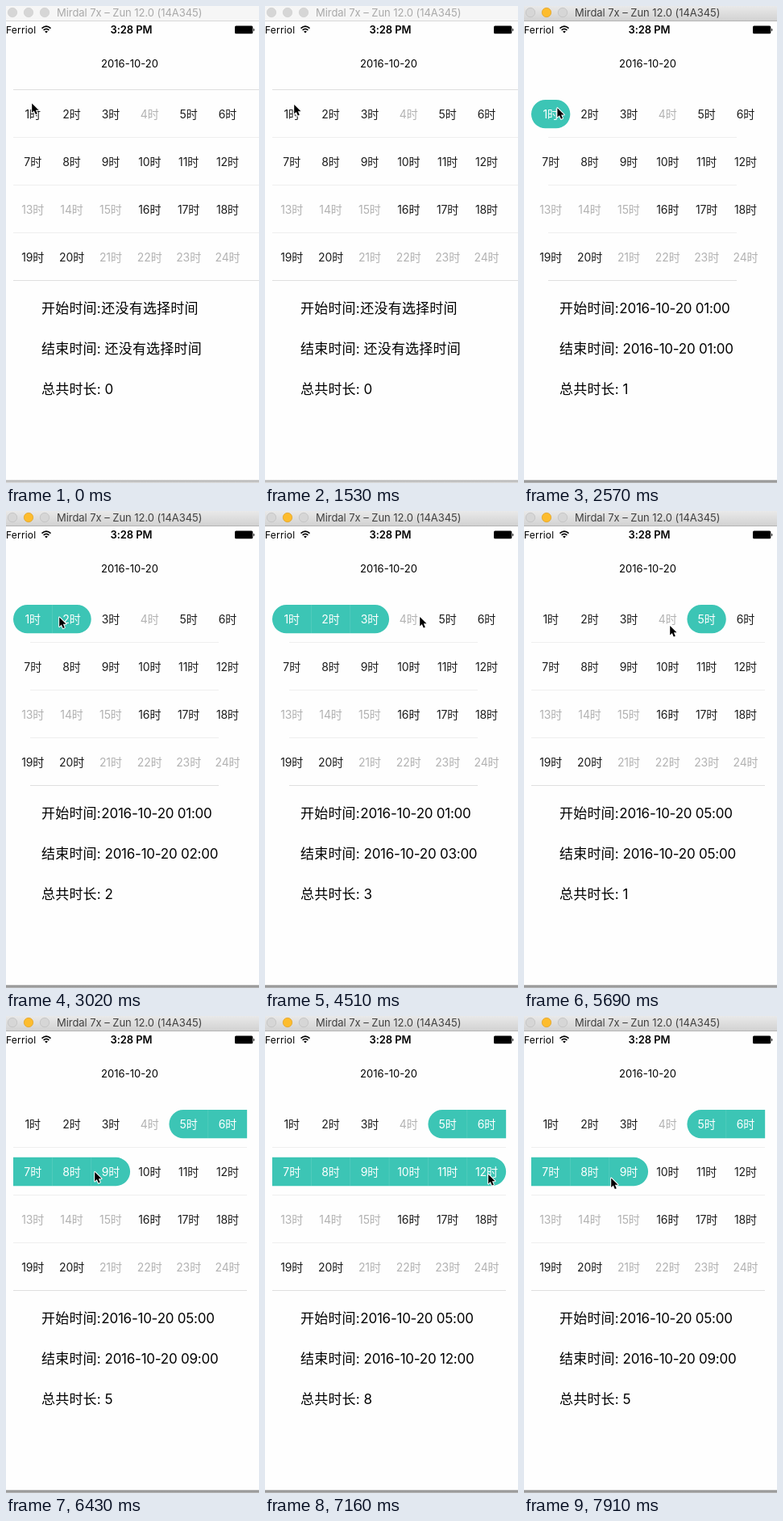
These frames come from a looping animation (314 by 590 pixels, 8000 ms). An HTML page:

```html
<!DOCTYPE html>
<html lang="zh-CN">
<head>
<meta charset="utf-8">
<title>时间选择</title>
<style>
  html, body { margin: 0; width: 100%; height: 100%; overflow: hidden; background: #fff; }
  svg { display: block; width: 314px; height: 590px; }
  text { font-family: Inter, "Noto Sans CJK SC", "Noto Sans CJK", sans-serif; white-space: pre; }
</style>
</head>
<body>
<svg id="stage" viewBox="0 0 314 590"></svg>
<script>
const LOOP = 8000, TICK = 148.5, FIRST_TICK = 325; // the screen refreshes in coarse ticks
const LEFT = 9, CELL = 48.36, TOP = 116, ROW = 58.87, PILL_H = 35.3;
const ACTIVATED = 2200;

// Eased pointer moves; a tap picks the hour under the pointer.
const START = { x: 31, y: 118.5 };
const MOVES = [
  { from: 300, to: 460, x: 35, y: 120 },
  { from: 1530, to: 1640, x: 35, y: 123, tap: 2350 },
  { from: 2420, to: 2920, x: 65, y: 129.5, tap: 2940 },
  { from: 3000, to: 3280, x: 130, y: 129.5, tap: 3380 },
  { from: 4350, to: 4460, x: 191, y: 129 },
  { from: 4490, to: 4780, x: 219, y: 138, tap: 4870 },
  { from: 5090, to: 5650, x: 180, y: 140 },
  { from: 5680, to: 6250, x: 109, y: 191, tap: 6200 },
  { from: 6580, to: 7140, x: 276, y: 194, tap: 7100 },
  { from: 7160, to: 7590, x: 125, y: 199, tap: 7700 },
  { from: 7760, to: 7890, x: 107, y: 198.5 }
];

const isBooked = h => h === 4 || (h >= 13 && h <= 15) || h > 20;
const hourAt = ({ x, y }) => 6 * Math.floor((y - TOP) / ROW) + Math.floor((x - LEFT) / CELL) + 1;
const ease = p => p * p * (3 - 2 * p);

function pointerAt(t) {
  return MOVES.reduce((pos, m) => {
    const p = ease(Math.min(1, Math.max(0, (t - m.from) / (m.to - m.from))));
    return { x: pos.x + (m.x - pos.x) * p, y: pos.y + (m.y - pos.y) * p };
  }, START);
}

// A tap resizes the range, or starts a new one when a booked hour is in the way.
function rangeAt(t) {
  let first = 0, last = 0;
  for (const move of MOVES.filter(m => m.tap <= t)) {
    last = hourAt(move);
    let blocked = !first;
    for (let h = first; h <= last; h++) blocked ||= isBooked(h);
    if (blocked) first = last;
  }
  return [first, last];
}

const rect = (x, y, w, h, fill, extra = '') =>
  `<rect x="${x}" y="${y}" width="${w}" height="${h}" fill="${fill}" ${extra}/>`;
const label = (x, y, size, content, extra = '') =>
  `<text x="${x}" y="${y}" font-size="${size}" ${extra}>${content}</text>`;
const gradient = (id, top, bottom) =>
  `<linearGradient id="${id}" x2="0" y2="1"><stop stop-color="${top}"/><stop offset="1" stop-color="${bottom}"/></linearGradient>`;

function titleBar(active) {
  let out = rect(0, 0, 314, 18, active ? 'url(#bar)' : '#f6f6f6')
    + rect(0, 18, 314, 1, active ? '#b4b4b4' : '#d8d8d8');
  for (let i = 0; i < 3; i++) {
    const lit = active && i === 1;
    out += `<circle cx="${8 + i * 20}" cy="8" r="5.7" fill="${lit ? '#fdbc2d' : '#d6d6d6'}"
      stroke="${lit ? '#dfa023' : active ? '#bdbdbd' : '#cfcfcf'}" stroke-width=".7"/>`;
  }
  return out + label(63, 13, 13, 'Mirdal 7x – Zun 12.0 (14A345)',
    `fill="${active ? '#404040' : '#a9a9a9'}" letter-spacing="-.05"`);
}

function statusBar() {
  return label(0, 33.5, 12, 'Ferriol', 'letter-spacing=".2"')
    + `<path d="M44.5 27.6Q50 22.6 55.5 27.6M46.6 29.9Q50 26.8 53.4 29.9" fill="none" stroke="#000" stroke-width="1.6"/>
       <path d="M48.1 31.5Q50 29.9 51.9 31.5L50 33.6Z"/>`
    + label(155.5, 34, 13, '3:28 PM', 'font-weight="600" text-anchor="middle" letter-spacing="-.1"')
    + rect(284, 24.6, 22.3, 9.6, '#000', 'rx="1.5"')
    + '<path d="M307.2 27.5Q309.6 29.5 307.2 31.5Z"/>';
}

function dividers(first) {
  const [from, to] = !first ? [LEFT, 314] : first === 1 ? [30, 264] : [LEFT, 299];
  let out = '';
  for (let i = first ? 1 : 0; i <= 4; i++)
    out += rect(from, Math.round(103.3 + i * ROW), to - from, 1, i % 4 ? '#efefef' : '#dfdfdf');
  return out;
}

function pill(row, first, last) {
  const a = Math.max(first, row * 6 + 1), b = Math.min(last, row * 6 + 6);
  if (!first || a > b) return '';
  const x0 = LEFT + (a - 1 - row * 6) * CELL, x1 = LEFT + (b - row * 6) * CELL;
  const y = TOP + row * ROW, r = PILL_H / 2;
  const capL = a === first ? r : 0, capR = b === last ? r : 0;
  const side = (cap, dy) => cap ? `a${r} ${r} 0 0 1 0 ${dy}` : `v${dy}`;
  let out = `<path fill="#3cc5b5" d="M${x0 + capL} ${y}H${x1 - capR}${side(capR, PILL_H)}H${x0 + capL}${side(capL, -PILL_H)}Z"/>`;
  for (let x = x0 + CELL; x < x1 - 1; x += CELL)
    out += rect(x - .4, y, .8, PILL_H, '#fff', 'opacity=".13"');
  return out;
}

function hours(first, last) {
  let out = '';
  for (let row = 0; row < 4; row++) out += pill(row, first, last);
  for (let h = 1; h <= 24; h++) {
    const col = (h - 1) % 6, row = Math.floor((h - 1) / 6);
    const fill = isBooked(h) ? '#b2b2b2' : h >= first && h <= last ? '#fff' : '#1c1c1c';
    out += label(LEFT + (col + .5) * CELL, 139 + row * ROW, 14, h + '时',
      `fill="${fill}" text-anchor="middle" letter-spacing="-.1"`);
  }
  return out;
}

function summary(first, last) {
  const stamp = h => first ? `2016-10-20 ${String(h).padStart(2, '0')}:00` : '还没有选择时间';
  const line = (y, title, x, value) => label(44, y, 17, title, 'letter-spacing=".2"')
    + label(x, y, 17, value, `letter-spacing="${first ? -.24 : .2}"`);
  return line(380, '开始时间:', 118.3, stamp(first))
    + line(430, '结束时间:', 122.5, stamp(last))
    + line(480, '总共时长:', 122.5, first ? last - first + 1 : 0);
}

function cursor({ x, y }) {
  return `<path transform="translate(${x} ${y})" d="M1.2 2V13.4L3.8 11 5.8 15.6 7.8 14.7 5.9 10.3H9.5Z"
    stroke="#fff" stroke-width="2" paint-order="stroke" stroke-linejoin="round"/>`;
}

function scene(t) {
  const active = t >= ACTIVATED, [first, last] = rangeAt(t);
  return gradient('bar', '#e9e9e9', '#d2d2d2')
    + (active ? gradient('shade', '#858585', '#b5b5b5') : gradient('shade', '#a8a8a8', '#dedede'))
    + rect(0, 0, 314, 590, '#fefefe') + titleBar(active) + statusBar()
    + label(153.5, 76, 13, '2016-10-20', 'text-anchor="middle" letter-spacing=".03"')
    + dividers(first) + hours(first, last) + summary(first, last)
    + rect(0, 586.5, 314, 3.5, 'url(#shade)') + cursor(pointerAt(t));
}

const stage = document.getElementById('stage');
let shownTick;
function draw() {
  const tick = Math.floor((performance.now() % LOOP - FIRST_TICK) / TICK);
  if (tick !== shownTick) {
    shownTick = tick;
    stage.innerHTML = scene(FIRST_TICK + tick * TICK);
  }
  requestAnimationFrame(draw);
}
draw();
</script>
</body>
</html>
```
